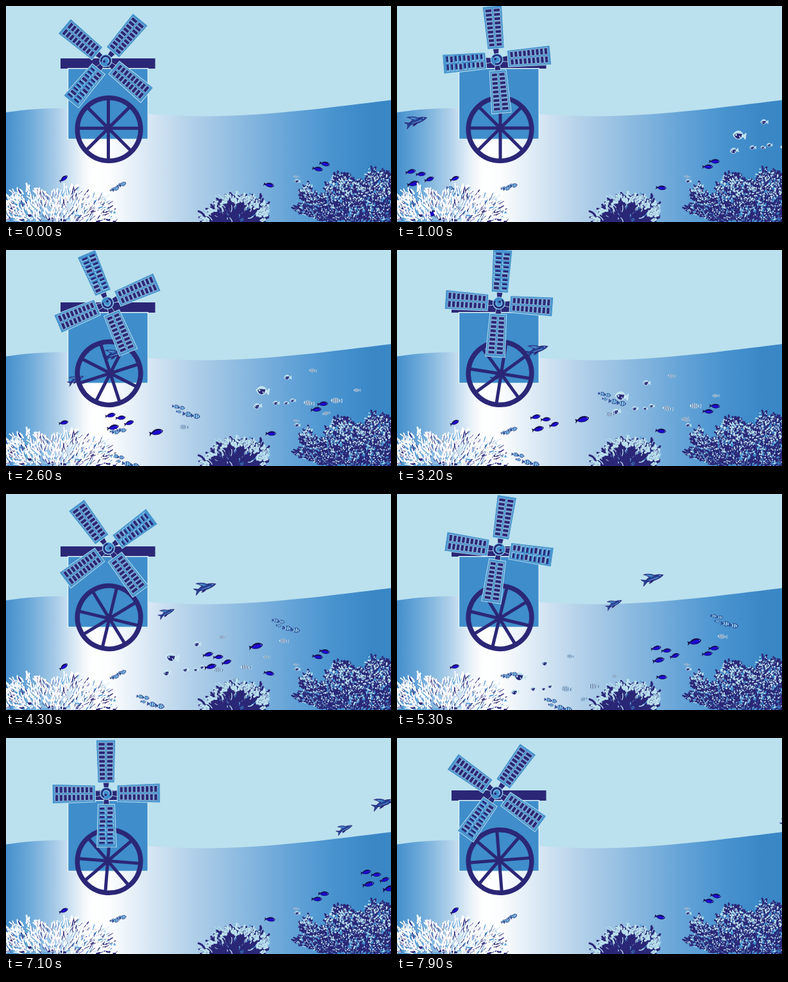
Write an HTML page with a canvas that moves like this. It is 600 px wide and 338 px high and loops after 8 s.

```html
<!DOCTYPE html>
<html>
<head>
<meta charset="utf-8">
<style>
html, body { margin: 0; width: 100%; height: 100%; overflow: hidden; background: #bbe1ee; }
canvas { display: block; }
</style>
</head>
<body>
<canvas id="stage" width="600" height="338"></canvas>
<script>
const W = 600, H = 338, LOOP = 8000, TAU = Math.PI * 2;
const NAVY = '#2b2777', BLUE = '#3f8dcb', PALE = '#bbe1ee', WHITE = '#fff', VIVID = '#1c0cd0';
const stage = document.getElementById('stage').getContext('2d');

let seed = 7;
const rnd = (a = 0, b = 1) => {
  seed = (seed * 16807) % 2147483647;
  return a + (b - a) * seed / 2147483647;
};
const rad = d => d * Math.PI / 180;

function layer(paint) {
  const c = document.createElement('canvas');
  c.width = W; c.height = H;
  paint(c.getContext('2d'));
  return c;
}

function at(x, y, deg, scale, paint) {
  stage.save();
  stage.translate(x, y);
  stage.rotate(rad(deg));
  stage.scale(scale, scale);
  paint(stage);
  stage.restore();
}

function shape(g, d, fill, stroke, width = 1) {
  const p = new Path2D(d);
  if (fill) { g.fillStyle = fill; g.fill(p); }
  if (stroke) { g.strokeStyle = stroke; g.lineWidth = width; g.stroke(p); }
}

function line(g, x, y, angle, len, color, width, bend = 0) {
  const dx = Math.cos(angle) * len, dy = Math.sin(angle) * len;
  g.strokeStyle = color;
  g.lineWidth = width;
  g.lineCap = 'round';
  g.beginPath();
  g.moveTo(x, y);
  g.quadraticCurveTo(x + dx / 2 - dy * bend, y + dy / 2 + dx * bend, x + dx, y + dy);
  g.stroke();
}

function dot(g, x, y, r, color) {
  g.fillStyle = color;
  g.beginPath();
  g.arc(x, y, r, 0, TAU);
  g.fill();
}

// Calls paint at n random points inside the outline d.
function scatter(g, d, x0, y0, n, paint) {
  const p = new Path2D(d);
  while (n > 0) {
    const x = rnd(x0, x0 + 175), y = rnd(y0, H);
    if (g.isPointInPath(p, x, y)) { paint(x, y); n--; }
  }
}

const backdrop = layer(g => {
  g.fillStyle = PALE;
  g.fillRect(0, 0, W, H);
  const sea = g.createLinearGradient(0, 0, W, 0);
  [[0, '#468fcc'], [.06, '#6ba9d9'], [.13, '#a9cce8'], [.2, '#f0f6fb'], [.225, WHITE], [.27, '#fbfdfe'],
   [.37, '#d8e7f4'], [.47, '#b5d2ea'], [.58, '#95bfe2'], [.73, '#67a5d8'], [.85, '#4893cf'], [.95, '#3b87c6'], [1, '#3a87c6']]
    .forEach(s => sea.addColorStop(...s));
  shape(g, 'M0 166.6C30 161.6 60 160 90 160C160 160 210 172.4 310 172.4C410 172.4 510 158 600 147.3V338H0Z', sea);
});

const house = layer(g => {
  shape(g, 'M85 82H232.5V98H85Z', NAVY);
  shape(g, 'M96.5 97.7H221.3V208.5H96.5Z', BLUE, '#def1f8', 1.5);
});

const corals = layer(g => {
  const left = 'M0 297L20 290L45 287L75 292L102 288L130 295L160 302L168 338H0Z';
  const fan = (x, y) => Math.atan2(y - 385, x - 82) + rnd(-.6, .6);
  scatter(g, left, 0, 275, 260, (x, y) => {
    const a = fan(x, y), len = rnd(6, 14);
    line(g, x + 1, y + .7, a, len * .85, rnd() < .6 ? NAVY : BLUE, 1.6, rnd(-.2, .2));
    line(g, x, y, a, len, WHITE, rnd(1.5, 2.8), rnd(-.2, .2));
  });
  scatter(g, left, 0, 300, 55, (x, y) => line(g, x, y, fan(x, y), rnd(3, 7), NAVY, 1));
  scatter(g, left, 0, 316, 26, (x, y) => line(g, x, y, rnd(-.4, .4), rnd(3, 7), rnd() < .6 ? NAVY : '#6ba9d9', 2.6));
  scatter(g, left, 0, 300, 130, (x, y) => line(g, x, y, fan(x, y), rnd(5, 9), WHITE, 1.9));

  const dome = 'M309 338L306 327L322 320L325 304L340 301L352 296L376 298L396 303L407 313L405 325L399 338Z';
  shape(g, dome, NAVY);
  const out = (x, y, spread) => Math.atan2(y - 350, x - 357) + rnd(-spread, spread);
  scatter(g, dome, 300, 290, 60, (x, y) => line(g, x, y, out(x, y, .5), rnd(6, 12), rnd() < .4 ? BLUE : PALE, 1.3, .2));
  scatter(g, dome, 300, 290, 60, (x, y) => line(g, x, y, out(x, y, .5), rnd(6, 12), NAVY, 3, .2));
  scatter(g, dome, 300, 290, 230, (x, y) => {
    if (Math.hypot((x - 357) / 52, (y - 343) / 46) < .74) return;
    const a = out(x, y, .9);
    line(g, x, y, a, rnd(3, 5), NAVY, 3);
    line(g, x, y, a, rnd(2, 6), PALE, rnd(2.4, 4), rnd(-.4, .4));
  });

  const bush = 'M445 318L462 309L457 286L474 279L484 293L494 296L499 280L514 265L533 264L543 277L560 268L568 255L585 258L600 264V338H490L470 329Z';
  const up = (x, y) => Math.atan2(y - 365, x - 535) + rnd(-.6, .6);
  scatter(g, bush, 440, 250, 900, (x, y) => line(g, x, y, up(x, y), rnd(3, 7), NAVY, rnd(1.8, 3.2), .2));
  scatter(g, bush, 440, 250, 1250, (x, y) => {
    const low = Math.max(0, (y - 285) / 53);
    if (rnd() < 1 - low * .55)
      dot(g, x + rnd(-3, 3), y + rnd(-4, 1), rnd(.6, 1.6 - low * .5), rnd() < .92 ? PALE : BLUE);
  });
  scatter(g, bush, 440, 250, 260, (x, y) => line(g, x, y, up(x, y), rnd(1, 3), NAVY, 1.1));
});

// Sails
function blade(g, odd) {
  shape(g, 'M5 -3L18 -5V5L5 3Z', NAVY, PALE, .8);
  shape(g, 'M17 -13L84 -15.2V15.2L17 13Z', BLUE, PALE, 1);
  shape(g, 'M19.5 -11.3L81.5 -13V13L19.5 11.3Z', null, '#6fb0dc', .6);
  for (const side of [-1, 1]) for (let i = 0; i < 9; i++) {
    const x = 21 + i * 6.7, h = 9 + i * .17, y = side < 0 ? -1.3 - h : 1.3;
    if (odd && (i + side) % 4 > 0) {
      g.fillStyle = NAVY;
      g.fillRect(x + 1, y + 2, 3, h - 2);
      shape(g, `M${x} ${y + h}V${y}H${x + 4.8}`, null, PALE, .8);
    } else {
      shape(g, `M${x} ${y}h5.1v${h}h-5.1Z`, NAVY, PALE, .7);
    }
  }
}

function sails(t) {
  const turn = 220 + 45 * t, a = rad(turn + 36);
  at(157.5 + 2.2 * Math.sin(a), 85 - 2.2 * Math.cos(a), turn - 90, 1, g => {
    for (let i = 0; i < 4; i++) {
      blade(g, i === 0);
      g.rotate(Math.PI / 2);
    }
    dot(g, 0, 0, 10, PALE);
    dot(g, 0, 0, 9.2, BLUE);
    g.strokeStyle = NAVY;
    g.lineWidth = 2.4;
    g.beginPath(); g.arc(0, 0, 7, .6, 5.2); g.stroke();
    g.strokeStyle = PALE;
    g.lineWidth = .8;
    g.beginPath(); g.arc(0, 0, 4.6, 0, 5); g.stroke();
    dot(g, 2.5, 1, 2, NAVY);
  });
}

// The spokes sit slightly off the middle of the rim.
function wheel(t) {
  at(160.5, 193, 45 * t, 1, g => {
    g.strokeStyle = NAVY;
    g.lineCap = 'butt';
    g.lineWidth = 7.5;
    g.beginPath(); g.arc(0, 0, 49.3, 0, TAU); g.stroke();
    g.translate(-1, -1.7);
    g.lineWidth = 5;
    for (let i = 0; i < 4; i++) {
      g.beginPath(); g.moveTo(-48, 0); g.lineTo(48, 0); g.stroke();
      g.rotate(Math.PI / 4);
    }
    dot(g, 0, 0, 6, NAVY);
  });
}

// Fish, each about 20 px long at scale 1
function tang(g) {
  shape(g, 'M-6 0L-11 -2L-10 1L-11 5Z', '#14104a');
  shape(g, 'M-8 1C-5 -5 5 -7 10 -1C8 5 -4 6 -8 1Z', '#14104a');
  shape(g, 'M-7 1.5C-4 -2 4 -4 9 -.5C6 4 -3 4.5 -7 1.5Z', VIVID);
  dot(g, 7.5, -1, .7, PALE);
}

function clown(g) {
  shape(g, 'M-5 0L-10 -4V4ZM-6 0C-3 -7 6 -7 10 0C6 7 -3 7 -6 0Z', '#2a6fb4', NAVY, .9);
  shape(g, 'M-3 -3.5V3.5M2 -4.5V4.5M6 -2.5V2.5', null, PALE, 2);
}

function round(g) {
  shape(g, 'M5 0L10 -5V5ZM6 0C4 -9 -6 -9 -10 0C-6 8 4 8 6 0Z', PALE, '#e3f4fa', .8);
  shape(g, 'M-8 0C-5 -4 -1 -2 4 -3L3 3C-1 7 -5 6 -8 0Z', NAVY);
  dot(g, -5, 0, 1.5, PALE);
  shape(g, 'M0 1L3 4', null, PALE, 1.4);
}

function striped(g) {
  shape(g, 'M5 0L10 -4V4ZM7 0C3 -6 -6 -6 -10 0C-6 6 3 6 7 0Z', '#d3ebf4', '#7fb5d8', .7);
  shape(g, 'M-6 -3V3M-3 -4V4M0 -4V4M3 -3V3M8 -2V2', null, '#34528f', 1.2);
}

function flyer(g) {
  shape(g, 'M-10 2L-19 0L-14 4L-16 11L-8 4Z', '#25489a', NAVY, .9);
  shape(g, 'M-12 3C-5 -4 8 -7 18 -3C12 2 -4 7 -12 3Z', '#25489a', NAVY, 1.2);
  shape(g, 'M6 -3C0 -8 -6 -9 -13 -8C-8 -6 -5 -3 -2 0Z', '#2f66b0', NAVY, 1);
  shape(g, 'M4 1C1 6 -3 8 -7 8L-3 3Z', NAVY);
  shape(g, 'M-6 3L9 0M-8 -6L0 -4', null, '#6ba9d9', 1);
  dot(g, 13, -3, .8, PALE);
}

// Points are [seconds, x, y].
function track(points, t) {
  let i = 1;
  while (i < points.length - 1 && t > points[i][0]) i++;
  const [t0, x0, y0] = points[i - 1], [t1, x1, y1] = points[i];
  const k = (t - t0) / (t1 - t0);
  return [x0 + (x1 - x0) * k, y0 + (y1 - y0) * k];
}

const paths = {
  tangs: [[0, -67, 262], [2, 110, 256], [3.2, 216, 261], [4.3, 315, 251], [5.3, 404, 241], [6.3, 491, 222], [8, 640, 196]],
  mixed: [[0, -75, 345], [2, 180, 305], [3.2, 289, 265], [4.3, 390, 238], [5.3, 464, 231], [6.3, 539, 233], [8, 665, 238]],
  low: [[0, 122, 362], [2, 172, 333], [3.2, 200, 328], [4.3, 225, 325], [5.3, 251, 330], [6.3, 276, 337], [8, 318, 362]],
  pale: [[0, 656, 172], [2, 489, 191], [3.2, 389, 208], [4.3, 298, 235], [5.3, 231, 265], [6.3, 165, 301], [8, 53, 360]],
  flyers: [[0, -60, 190], [2, 119, 170], [3.2, 218, 156], [4.3, 310, 146], [5.3, 398, 132], [6.3, 505, 115], [8, 680, 88]]
};
// Members are [fish, dx, dy, scale, angle].
const clowns = (x, y) => [[-16, -8], [-7, -6], [2, 4], [15, 7], [-11, 0]]
  .map(([dx, dy], i) => [clown, x + dx, y + dy, i === 4 ? .4 : i > 1 ? .68 : .52, 8]);
const schools = {
  tangs: [[tang, 0, 0, .78, -8], [tang, 16, 4, .75, 0], [tang, 29, 12, .75, -14], [tang, 4, 19, .9, -8]],
  mixed: [[tang, 0, 0, 1.05, -8], ...clowns(46, -32), [striped, 43, -8, .75, 4]],
  low: clowns(0, 0),
  pale: [[round, 0, 0, .58, 0], [striped, 39, -11, .6, 5], [round, -39, 21, 1, 8], [round, -47, 45, .65, -10],
    [round, -18, 40, .5, 0], [round, -2, 40, .4, 0], [round, 8, 36, .45, 0], [striped, 33, 40, .85, 8],
    [striped, 76, 36, .9, 2], [striped, 60, 56, .6, -12], [striped, 108, 20, .55, 0]]
};

function school(name, t) {
  const [x, y] = track(paths[name], t);
  for (const [fish, dx, dy, scale, deg] of schools[name]) at(x + dx, y + dy, deg, scale, fish);
}

function residents(t) {
  const s = (1 - Math.cos(TAU * t / 4)) / 2;
  at(90, 270, -32 + 32 * s, .72, tang);
  at(410 + 4 * s, 280 + 9 * s, 16 - 14 * s, .8, tang);
  at(486 - 3 * s, 255 - 7 * s, 14 - 20 * s, .8, tang);
  at(497 - 4 * s, 247 - 8 * s, 16 - 22 * s, .8, tang);
  for (const [x, y, drop, size] of [[166, 287, -4, .4], [171, 286, -1, .55], [177, 280, 2, .42], [182, 279, 4, .55]])
    at(x, y + drop * s, -28 + 30 * s, size, clown);
  at(452, 267, 5, .45, striped);
  at(454, 274, 5, .45, round);
}

function draw(t) {
  stage.drawImage(backdrop, 0, 0);
  stage.drawImage(house, 0, 0);
  const [x, y] = track(paths.flyers, t);
  at(x, y, -8, .95, flyer);
  at(x - 60, y + 40, -14, .72, flyer);
  wheel(t);
  sails(t);
  school('pale', t);
  school('mixed', t);
  school('tangs', t);
  school('low', t);
  residents(t);
  stage.drawImage(corals, 0, 0);
}

const start = performance.now();
function tick() {
  const ms = (performance.now() - start) % LOOP;
  draw(Math.floor(ms / 100) / 10);
  requestAnimationFrame(tick);
}
tick();
</script>
</body>
</html>
```
